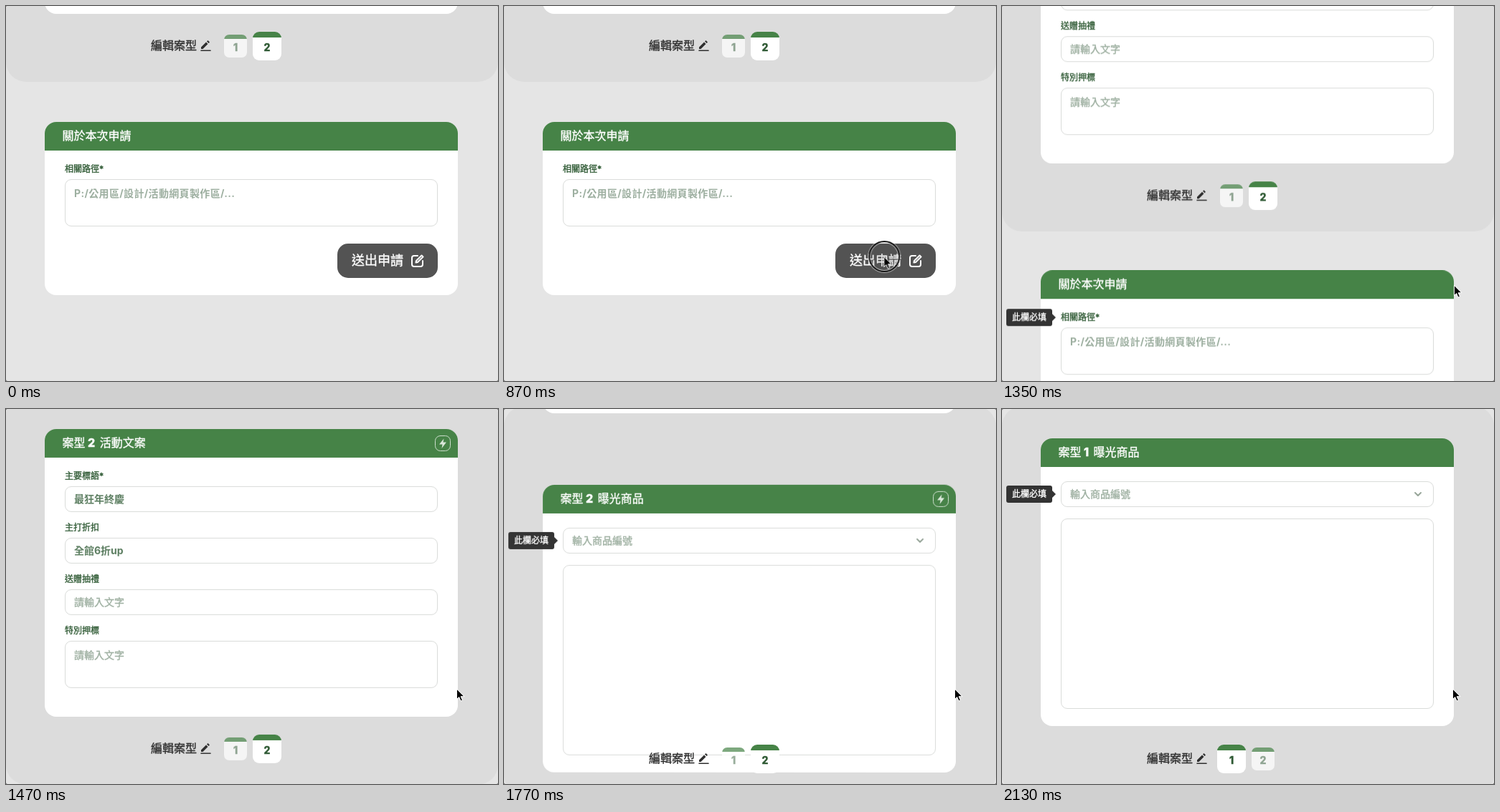
These frames come from a looping animation (686 by 524 pixels, 2760 ms). An HTML page:

```html
<!DOCTYPE html>
<html lang="zh-Hant">
<head>
<meta charset="utf-8">
<title>申請表單</title>
<style>
:root { --green: #468347; --loop: 2760ms; }
* { box-sizing: border-box; }
html, body { margin: 0; width: 100%; height: 100%; overflow: hidden; background: #555; }
/* a hairline stroke brings regular CJK glyphs up to medium weight */
body { font: 500 14px Inter, "Noto Sans CJK TC", "Noto Sans CJK JP", sans-serif; -webkit-text-stroke: .35px; }
.stage { position: relative; width: 686px; height: 524px; overflow: hidden; border-radius: 2px; background: #e5e5e5; }
.stage *, .tip::after { position: absolute; }
.stage span, .stage b { position: static; }
svg { fill: none; stroke-linecap: round; stroke-linejoin: round; overflow: visible; }

.page { inset: 0; animation: scroll var(--loop) infinite; }
.panel { top: -437px; width: 686px; height: 543px; border-radius: 28px; background: #dcdcdc; overflow: hidden; }
.stack { top: 46px; width: 686px; height: 904px; animation: slide-up var(--loop) infinite; }
.row { top: 502px; width: 686px; height: 402px; perspective: 1200px; }

.card { left: 54px; width: 576px; height: 402px; border-radius: 16px; background: #fff; }
.head { width: 100%; height: 40px; padding-left: 24.5px; border-radius: 16px 16px 0 0; background: var(--green);
  color: #fff; font-size: 16px; line-height: 39px; white-space: pre; }
.head b { margin: 0 6.5px 0 3.5px; font-weight: 800; }
.bolt { right: 10px; top: 9px; width: 22px; height: 22px; }
.label { left: 28px; color: #2f5a34; font-size: 12px; line-height: 20px; white-space: nowrap; }
.field { left: 28px; width: 520px; height: 36px; padding-left: 12px; border: 1px solid #dadcda; border-radius: 9px;
  color: #9dafa0; line-height: 34px; white-space: nowrap; }
.area { height: 66px; line-height: 38px; }
.path { font-weight: 700; letter-spacing: .35px; -webkit-text-stroke: 0; }
.value { color: #5c7e61; font-weight: 700; -webkit-text-stroke: 0; }
.chevron { right: 16px; top: 14px; width: 10px; height: 6px; stroke: #98a69a; stroke-width: 2; }

.tip { left: -48px; width: 64px; height: 24px; border-radius: 3px; background: #333; color: #fff; font-size: 12px;
  line-height: 24px; text-align: center; white-space: nowrap; animation: show var(--loop) step-end infinite; }
.tip::after { content: ""; left: 64px; top: 7px; border: 5px solid transparent; border-left-color: #333; border-right: 0; }

.case1 { animation: enter var(--loop) infinite, unfold var(--loop) infinite; }
.case2 { animation: leave var(--loop) infinite, fold var(--loop) infinite; }

.tabs { top: 473px; width: 686px; height: 40px; }
.caption { left: 202px; color: #2e2e2e; font-size: 16px; line-height: 39px; white-space: nowrap; }
.pen { left: 271px; top: 12px; width: 15px; height: 15px; }
.tab { top: 0; width: 40px; height: 40px; line-height: 44px; text-align: center; font-weight: 800; color: #2f5a34; }
.tab i { inset: 0; border-radius: 9px; background: linear-gradient(var(--green) 8px, #fff 8px); }
.stage .tab span { position: relative; }
.on, .on *, .off, .off * { animation: var(--loop) infinite; }
.on, .on span { animation-name: brighten; } .on i { animation-name: grow; }
.off, .off span { animation-name: dim; } .off i { animation-name: shrink; }

.form { top: 162px; height: 242px; animation: settle var(--loop) infinite; }
.send { left: 408px; top: 170px; width: 140px; height: 48px; padding-left: 20px; border-radius: 15px;
  background: #535353; color: #fff; font-size: 18px; line-height: 47px; white-space: nowrap; }
.send span { display: inline-block; line-height: 22px; animation: select var(--loop) step-end infinite; }
.send svg { left: 103px; top: 15px; width: 18px; height: 18px; stroke: #fff; stroke-width: 2; }

.mouse { left: 0; top: 0; animation: move var(--loop) linear infinite; }
.ring { left: -22px; top: -22px; width: 44px; height: 44px; border: 2px solid #111; border-radius: 50%;
  box-shadow: 0 0 0 1px #fff9, inset 0 0 0 1px #fff9; background: #5552; animation: press var(--loop) step-end infinite; }
.arrow { left: -1px; top: 0; width: 12px; height: 18px; fill: #000; stroke: #fff; }

@keyframes scroll {
  0%, 43.37% { translate: 0 0; animation-timing-function: ease-in-out; }
  54.75%, 100% { translate: 0 433px; }
}
@keyframes settle { 0%, 43.37% { translate: 0 0; } 45.6%, 100% { translate: 0 -2px; } }
@keyframes slide-up { 0%, 57.22% { translate: 0 0; } 69.2%, 100% { translate: 0 -503px; } }
@keyframes enter { 0%, 65.75% { translate: -758px 0; } 76.62%, 100% { translate: 0 0; } }
@keyframes leave { 0%, 65.75% { translate: 0 0; } 76.62%, 100% { translate: 758px 0; } }
@keyframes unfold { 0%, 64.13% { rotate: y 50deg; opacity: 0; } 75%, 100% { rotate: y 0deg; opacity: 1; } }
@keyframes fold { 0%, 64.13% { rotate: y 0deg; opacity: 1; } 75%, 100% { rotate: y -50deg; opacity: 0; } }
@keyframes brighten { 0%, 64.67% { opacity: .7; } 75.54%, 100% { opacity: 1; } }
@keyframes dim { 0%, 64.67% { opacity: 1; } 75.54%, 100% { opacity: .7; } }
@keyframes grow { 0%, 64.67% { scale: .8; } 75.54%, 100% { scale: 1; } }
@keyframes shrink { 0%, 64.67% { scale: 1; } 75.54%, 100% { scale: .8; } }
@keyframes show { 0% { opacity: 0; } 32.07%, 100% { opacity: 1; } }
@keyframes select { 0% { background: #6f8fbd00; } 32.07%, 100% { background: #6f8fbd; } }
@keyframes press { 0%, 19.38% { opacity: 0; } 16.12%, 21.56% { opacity: 1; } 32.07%, 100% { opacity: 0; } }
@keyframes move {
  0% { translate: 159px 530px; }
  1.09% { translate: 160px 518px; }
  3.26% { translate: 168px 360px; }
  5.43% { translate: 222px 215px; }
  7.61% { translate: 310px 181px; }
  9.78% { translate: 410px 240px; }
  11.96% { translate: 490px 312px; }
  14.13% { translate: 526px 346px; }
  15.22%, 31.52% { translate: 530px 350px; }
  34.78% { translate: 552px 354px; }
  39.13% { translate: 610px 375px; }
  42.39% { translate: 640px 387px; }
  45.65% { translate: 637px 387px; }
  50%, 100% { translate: 629px 391px; }
}
</style>
</head>
<body>
<div class="stage">
  <div class="page">
    <div class="panel">
      <div class="stack">
        <div class="card">
          <div class="head">案型<b>2</b>活動文案
            <svg class="bolt" viewBox="0 0 22 22"><rect x=".5" y=".5" width="21" height="21" rx="7" stroke="#cfe0cf"/><path d="M12.5 4.5 6 12.5h4.5L9.5 18l6.500-8.500h-4.500z" fill="#dbe8db"/></svg>
          </div>
          <div class="label" style="top:56px">主要標語*</div>
          <div class="field value" style="top:80px">最狂年終慶</div>
          <div class="label" style="top:128px">主打折扣</div>
          <div class="field value" style="top:152px">全館6折up</div>
          <div class="label" style="top:200px">送贈抽禮</div>
          <div class="field" style="top:224px">請輸入文字</div>
          <div class="label" style="top:272px">特別押標</div>
          <div class="field area" style="top:296px">請輸入文字</div>
        </div>
        <div class="row">
          <div class="card case2">
            <div class="head">案型<b>2</b>曝光商品
              <svg class="bolt" viewBox="0 0 22 22"><rect x=".5" y=".5" width="21" height="21" rx="7" stroke="#cfe0cf"/><path d="M12.5 4.5 6 12.5h4.5L9.5 18l6.500-8.500h-4.500z" fill="#dbe8db"/></svg>
            </div>
            <div class="tip" style="top:66px">此欄必填</div>
            <div class="field" style="top:60px">輸入商品編號<svg class="chevron" viewBox="0 0 10 6"><path d="M1 1l4 4 4-4"/></svg></div>
            <div class="field" style="top:112px;height:266px"></div>
          </div>
          <div class="card case1">
            <div class="head">案型<b>1</b>曝光商品</div>
            <div class="tip" style="top:66px">此欄必填</div>
            <div class="field" style="top:60px">輸入商品編號<svg class="chevron" viewBox="0 0 10 6"><path d="M1 1l4 4 4-4"/></svg></div>
            <div class="field" style="top:112px;height:266px"></div>
          </div>
        </div>
      </div>
      <div class="tabs">
        <div class="caption">編輯案型</div>
        <svg class="pen" viewBox="0 0 15 15"><path d="M1 12V9.500L8 2.500 10.500 5 3.500 12zM9 1.500 10.500 0 13 2.500 11.500 4z" fill="#2e2e2e"/><path d="M1 14.200h13" stroke="#2e2e2e" stroke-width="1.600"/></svg>
        <div class="tab on" style="left:300px"><i></i><span>1</span></div>
        <div class="tab off" style="left:344px"><i></i><span>2</span></div>
      </div>
    </div>
    <div class="card form">
      <div class="head">關於本次申請</div>
      <div class="tip" style="top:54px">此欄必填</div>
      <div class="label" style="top:56px">相關路徑*</div>
      <div class="field area path" style="top:80px">P:/公用區/設計/活動網頁製作區/...</div>
      <div class="send">送出<span>申請</span>
        <svg viewBox="0 0 18 18"><path d="M9 2H4a3 3 0 0 0-3 3v9a3 3 0 0 0 3 3h9a3 3 0 0 0 3-3V9M6.500 11.500l.5-2.500 7.500-7.500 2 2L9 11z"/></svg>
      </div>
    </div>
  </div>
  <div class="mouse">
    <div class="ring"></div>
    <svg class="arrow" viewBox="0 0 12 18"><path d="M.5.5v14l3.200-3 2.300 5.500 2.500-1-2.300-5.300h4.500z"/></svg>
  </div>
</div>
</body>
</html>
```
